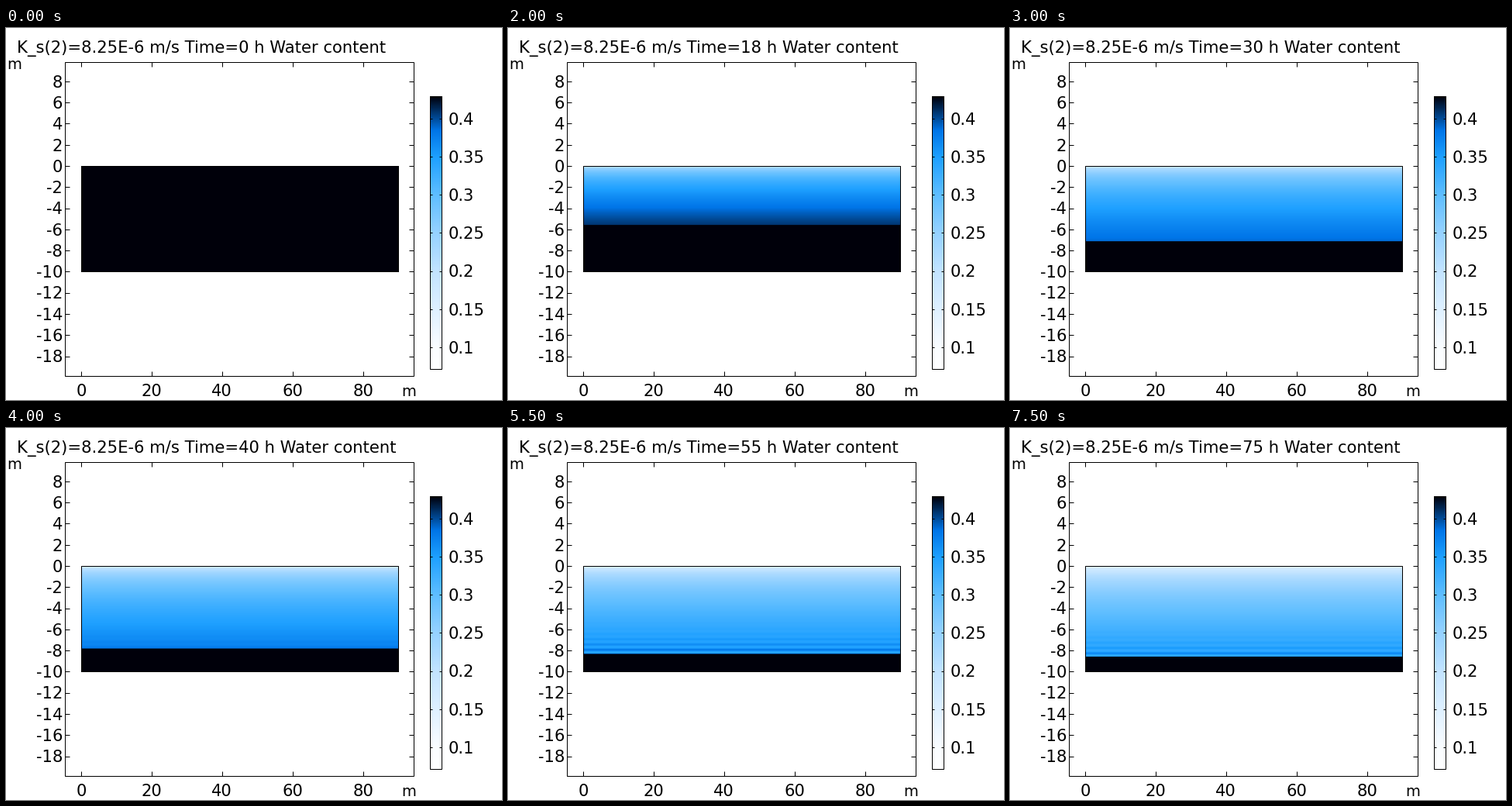
A matplotlib script that plays this animation: 640x480 px, repeating every 8 s.

```python
import numpy as np
import matplotlib.pyplot as plt
from matplotlib.animation import FuncAnimation
from matplotlib.colors import LinearSegmentedColormap
from matplotlib.patches import Rectangle

DPI = 80
PX = 72 / DPI
FRAMES = 16
LOW, HIGH = 0.0715, 0.4295
TOP, BOTTOM = 178, 314
CELL = 6.82  # mesh cell height in pixels

STOPS = [(LOW, (255, 255, 255)), (.10, (250, 253, 255)),
         (.20, (195, 228, 255)), (.25, (150, 210, 255)),
         (.30, (95, 190, 255)), (.35, (30, 160, 255)),
         (.385, (0, 117, 232)), (HIGH, (0, 0, 10))]
cmap = LinearSegmentedColormap.from_list(
    "water", [((v - LOW) / (HIGH - LOW), np.array(c) / 255) for v, c in STOPS],
    N=1024)

fig = plt.figure(figsize=(8, 6), dpi=DPI, facecolor="white")
ax = fig.add_axes([0, 0, 1, 1])
ax.axis("off")


def line(x0, y0, x1, y1):
    ax.plot([x0, x1], [y0, y1], color="black", lw=PX,
            solid_capstyle="butt", zorder=3)


def box(x0, y0, x1, y1):
    ax.add_patch(Rectangle((x0, y0), x1 - x0, y1 - y0, fill=False,
                           ec="black", lw=PX, zorder=3))


def label(x, y, text, ha="left", size=21.15):
    return ax.text(x, y, text, ha=ha, va="baseline", color="black",
                   family="DejaVu Sans", size=size * PX)


def shade(values, extent):
    return ax.imshow(values[:, None], cmap=cmap, vmin=LOW, vmax=HIGH,
                     extent=extent, aspect="auto", interpolation="nearest")


def hour_at(i):
    """Results come every 3 h up to 30 h, then every 5 h."""
    return 3 * round(1.6 * i) if i <= 6 else 5 * i


def water(hour):
    """Water content of each pixel row at the given hour."""
    depth = np.arange(BOTTOM - TOP + 1) + .5
    front = 118.5 * (1 - np.exp(-hour / 17.5))
    surface, base = .095, .335 + .12 * np.exp(-hour / 37)
    rel = np.clip(depth / max(front, .01), 0, 1)
    theta = surface + (base - surface) * rel ** (.19 + .002 * hour)

    # mesh ripples that build up above the front
    amp = .055 * np.exp(-((hour - 64) / 15) ** 2)
    wave = np.cos(2 * np.pi * (depth / CELL - (hour - 60) / 30))
    wave = np.where(wave > 0, wave, .6 * wave)
    theta += amp * wave * np.exp((np.minimum(depth, front) - front) / 11)

    wet = np.clip(depth - front + .5, 0, 1)
    return theta * (1 - wet) + HIGH * wet


# plot frame
L, T, R, B = 76, 44, 526, 449
box(L, T, R, B)
for v in range(0, 81, 20):
    x = 97 + 4.545 * v
    line(x, T, x, T + 6)
    line(x, B, x, B - 6)
    label(x, 475, str(v), "center")
for v in range(-18, 9, 2):
    y = TOP - 13.64 * v
    line(L, y, L + 6, y)
    line(R, y, R - 6, y)
    label(73, y + 7.8, str(v), "right")
label(1.5, 53, "m", size=19.5)
label(510.5, 475, "m", size=19.5)

# colour bar
shade(np.linspace(HIGH, LOW, 352), (547, 563, 441, 88))
box(547, 88, 562, 440)
for v in np.arange(.1, .41, .05):
    y = 117 + (.4 - v) * 983
    line(547, y, 550, y)
    line(559, y, 562, y)
    label(571, y + 7.8, f"{v:.2f}".rstrip("0"))

field = shade(water(0), (97, 507, BOTTOM + 1, TOP))
box(97, TOP, 506, BOTTOM)
title = label(13.5, 32, "")
ax.set_xlim(0, 640)
ax.set_ylim(480, 0)


def update(i):
    hour = hour_at(i)
    field.set_data(water(hour)[:, None])
    title.set_text(f"K_s(2)=8.25E-6 m/s Time={hour} h Water content")
    return field, title


anim = FuncAnimation(fig, update, frames=FRAMES, interval=500,
                     repeat=True, repeat_delay=0)
plt.show()
```
